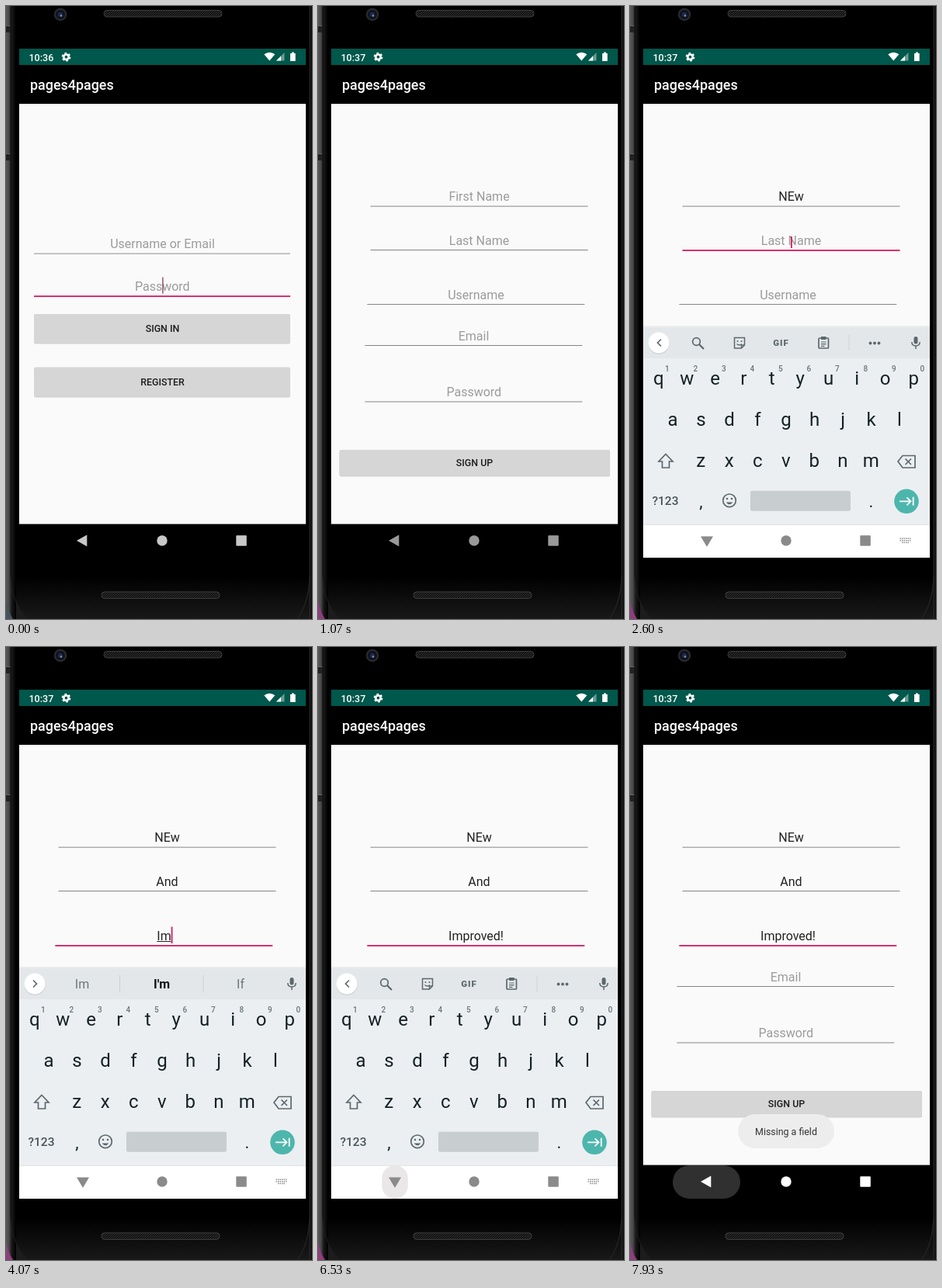
An HTML page for the animation above (8 s loop, 394 by 790 pixels).

```html
<!DOCTYPE html>
<html lang="en">
<head>
<meta charset="utf-8">
<title>Sign up</title>
<style>
  html, body { margin: 0; width: 100%; height: 100%; overflow: hidden; background: #050505; }
  svg { display: block; width: 394px; height: 790px; }
  text { font-family: Roboto, sans-serif; white-space: pre; }
  .mid { text-anchor: middle; }
  .med { font-weight: 500; }
  .ico { fill: none; stroke: #5c686d; stroke-width: 1.7; }
</style>
</head>
<body>
<script>
const LOOP = 8000, ACCENT = '#d81b60', APP = 'pages4pages';
const OPEN = 624, OPEN_MS = 425;

// ---- markup helpers ----
const rect = (x, y, w, h, fill, more = '') =>
  `<rect x="${x}" y="${y}" width="${w}" height="${h}" fill="${fill}" ${more}/>`;
const circle = (x, y, r, fill, more = '') =>
  `<circle cx="${x}" cy="${y}" r="${r}" fill="${fill}" ${more}/>`;
const path = (d, more = '') => `<path d="${d}" ${more}/>`;
const stroke = (d, color, width) => path(d, `fill="none" stroke="${color}" stroke-width="${width}"`);
const text = (x, y, size, fill, str, cls = 'mid', more = '') =>
  `<text x="${x}" y="${y}" font-size="${size}" fill="${fill}" class="${cls}" ${more}>${str}</text>`;
const group = (id, body, more = '') => `<g id="${id}" ${more}>${body}</g>`;

const appBars = () =>
  rect(17, 126, 369, 541.6, '#fafafa') + rect(17, 126, 369, 2, 'url(#barShade)') +
  rect(17, 55, 369, 21, '#00574b') + rect(17, 76, 369, 50, '#000') +
  text(31, 108, 17.9, '#fff', APP, 'med');

const button = (id, x, y, w, h, label) =>
  rect(x, y + 1.5, w, h, '#000', 'rx="2" opacity=".16"') +
  rect(x, y, w, h, '#d6d6d6', 'rx="1.5"') +
  `<clipPath id="${id}Clip">${rect(x, y, w, h, '#000', 'rx="1.5"')}</clipPath>` +
  `<g clip-path="url(#${id}Clip)">${circle(201, y + h / 2, 0, '#000', `id="${id}" opacity="0"`)}</g>` +
  text(201.5, y + h / 2 + 4.5, 12.4, '#1c1c1c', label, 'mid med');

// centre x, baseline, underline start, underline y, hint, cursor top and bottom
const fields = [
  [207.5, 251, 67.5, 257.6, 'First Name', 234, 255],
  [207.5, 308, 67.5, 314, 'Last Name', 297, 312],
  [203.5, 377.5, 63.3, 384, 'Username', 360.5, 382],
  [200.5, 430.5, 60.3, 437, 'Email'],
  [200.8, 503, 60.3, 509.5, 'Password'],
];
const fieldMarkup = ([cx, base, x, y, hint], i) =>
  text(cx, base, 16, '#9b9b9b', hint, 'mid', `id="text${i}"`) +
  rect(x, y, 280, 1, '#858585', `id="line${i}"`);

const login = appBars() +
  text(201.5, 312, 16, '#9b9b9b', 'Username or Email') + rect(36, 318.5, 330, 1.3, '#a9a9a9') +
  text(201.3, 366.5, 16, '#9b9b9b', 'Password') + rect(36, 373.2, 330, 1.8, ACCENT) +
  rect(201.3, 349.5, 1.2, 21, '#7d2a4a') +
  button('inRipple', 36, 397, 330, 37, 'SIGN IN') +
  button('regRipple', 36, 465.5, 330, 37.5, 'REGISTER');

const signup = appBars() + fields.map(fieldMarkup).join('') +
  rect(0, 0, 1.8, 0, ACCENT, 'id="cursor"') + rect(0, 379, 0, 1, '#222', 'id="compose"') +
  button('upRipple', 27.5, 572, 348.5, 33, 'SIGN UP');

const statusIcons = text(29.5, 70.5, 12.5, '#fff', '10:36', 'med', 'id="clock"') +
  circle(77.5, 65.7, 3.2, 'none', 'stroke="#fff" stroke-width="2.6"') +
  circle(77.5, 65.7, 5, 'none', 'stroke="#fff" stroke-width="1.8" stroke-dasharray="2.6 2.636"') +
  path('M332.3 62.3Q339.3 57.3 346.3 62.3L339.3 70.5Z', 'fill="#fff"') +
  path('M358.5 60V70.5H348Z', 'fill="#fff" opacity=".4"') +
  path('M354 64.5V70.5H348Z', 'fill="#fff"') +
  path('M366 61H368V59.5H370.8V61H372.7V71H366Z', 'fill="#fff"');

const homeIcons = circle(201, 689, 6.7, 'currentColor') +
  rect(296.3, 682.3, 13.5, 13.5, 'currentColor', 'rx="1"');
const navIcons = path('M91 689L104.3 681.5V696.5Z', 'fill="currentColor"') + homeIcons;

// ---- keyboard ----
const keyRow = (keys, x, y) => [...keys].map((k, i) =>
  text(x + 36.5 * i, y, 24, '#142126', k)).join('');
const digits = [...'1234567890'].map((d, i) =>
  text(47.8 + 36.5 * i, 470.5, 10, '#69767b', d, 'mid med')).join('');

const tools = path('M40 429.5L35.5 434L40 438.5', 'class="ico"') +
  circle(85.5, 432.5, 4.8, 'none', 'class="ico"') + path('M89 436L95 442', 'class="ico" style="stroke-width:2.2"') +
  path('M134.5 427.5H147.5V437L143.5 441H134.5Z M147.5 437H143.5V441', 'class="ico" style="stroke-width:1.5"') +
  circle(138.5, 432, 1, '#5c686d') + circle(143.5, 432, 1, '#5c686d') +
  path('M137.5 435.5Q141 438.5 144 435.5', 'class="ico" style="stroke-width:1.4"') +
  text(194.5, 438.3, 11.5, '#5c686d', 'GIF', 'mid', 'font-weight="900" letter-spacing=".9"') +
  rect(243, 428, 12.5, 13, 'none', 'class="ico" rx="1"') + rect(246, 426, 6.5, 4, '#5c686d') +
  path('M246 433H252.5M246 435.7H252.5M246 438.3H250.5', 'class="ico" style="stroke-width:1.2"') +
  rect(281.5, 424, 1, 20, '#cfd4d6') +
  [309.5, 315, 320.5].map(x => circle(x, 434.5, 1.9, '#5c686d')).join('');

const chips = path('M35 429.5L39.5 434L35 438.5', 'class="ico"') +
  rect(146, 423, 1, 22, '#cbd0d2') + rect(253.5, 423, 1, 22, '#cbd0d2') +
  [98, 200.5, 302].map((x, i) =>
    text(x, 440, 16, i === 1 ? '#111' : '#6b767b', '', 'mid', `id="chip${i}" font-weight="${i === 1 ? 700 : 400}"`)).join('');

const mic = rect(365.5, 426, 5, 9.5, '#5c686d', 'rx="2.5"') +
  path('M362.8 433Q363 438 368 438Q373 438 373.2 433M368 438V442', 'class="ico" style="stroke-width:1.5"');

const keys = rect(17, 414, 369, 340, '#eceff1') + rect(17, 414, 369, 40, '#e4e7e9') +
  rect(17, 412, 369, 2, '#000', 'opacity=".05"') +
  circle(37, 435, 13.8, '#000', 'opacity=".1"') + circle(37, 434, 13.5, '#fff') +
  group('tools', tools) + group('chips', chips) + mic +
  keyRow('qwertyuiop', 36.7, 488) + digits + keyRow('asdfghjkl', 55, 541) + keyRow('zxcvbnm', 91.3, 594) +
  path('M46 577.5L55 587H50.5V595H41.5V587H37Z', 'class="ico"') +
  path('M345 587L351 579.5H367V595H351Z M354.5 583.5L362 591M362 583.5L354.5 591', 'class="ico"') +
  text(45.5, 643, 15.5, '#46545a', '?123', 'mid med') + text(91.5, 646, 22, '#142126', ',') +
  circle(128, 637.3, 8.3, 'none', 'class="ico"') + circle(125, 635, 1.3, '#5c686d') + circle(131, 635, 1.3, '#5c686d') +
  path('M123.5 639.5Q128 645 132.5 639.5Z', 'fill="#5c686d"') +
  rect(155, 624.7, 129, 26, '#c8cdcf', 'rx="2"') + text(310.5, 646, 22, '#142126', '.') +
  circle(356, 638.3, 15.8, '#4db6ac') +
  stroke('M347 638.3H361M356.5 633.3L361.5 638.3L356.5 643.3M364.7 632.8V643.8', '#fff', 1.8);

const keyDots = [0, 1, 2].map(r => [0, 1, 2, 3, 4, 5].map(c =>
  r === 2 && (c === 0 || c === 5) ? '' : rect(347.5 + c * 2.5, 685.5 + r * 2.6, 1.5, 1.5, '#8a8a8a')).join('')).join('');
const whiteNav = rect(17, 668, 369, 43, '#fff') + rect(17, 668, 369, 1, '#e3e3e3') +
  rect(0, 668, 0, 43, '#e9e7e7', 'id="downRipple" rx="16"') +
  path('M91 683.5H107L99 697Z', 'fill="#8a8a8a"') +
  `<g color="#8a8a8a">${homeIcons}</g>` + keyDots;

// ---- phone body ----
const speaker = (x, y) => rect(x, y, 152, 8.5, 'url(#mesh)', 'rx="4" stroke="#3d3d3d"');
const shell = rect(0, 0, 394, 790, '#000') +
  rect(0, 735, 394, 55, 'url(#foot)') +
  path('M0 0H6V735Q8 772 29 790H0Z', 'fill="url(#side)"') +
  rect(7, 0, 6, 790, 'url(#rim)') +
  rect(390.5, 0, 1.2, 790, '#2b2b2b') + rect(392, 0, 2, 790, '#111') +
  [25, 190].map(y => rect(0, y, 6, 9, '#222') + rect(0, y, 6, 1, '#666')).join('') +
  path('M0 766Q3 781 9 790H0Z', 'fill="#46525c" id="desk"') +
  stroke('M6 0V735Q8 772 30 792', '#1c1c1c', 1.2) +
  stroke('M391 735Q390 770 374 792', '#222', 1.5) +
  speaker(126, 5.5) + speaker(123, 755) +
  circle(70, 11, 8.3, '#292a2e') + circle(70, 11, 6, '#10131c') + circle(70, 11, 3, '#1f2c50') + circle(71, 12.5, 1.2, '#8497c4');

const grad = (id, dir, ...stops) => `<linearGradient id="${id}" ${dir}>` + stops.map(([o, c, a = 1]) =>
  `<stop offset="${o}" stop-color="${c}" stop-opacity="${a}"/>`).join('') + '</linearGradient>';

document.body.innerHTML = `<svg viewBox="0 0 394 790"><defs>
  ${grad('side', 'gradientUnits="userSpaceOnUse" x1="0" x2="7"', [0, '#5a5a5a'], [.55, '#484848'], [1, '#1c1c1c'])}
  ${grad('rim', 'x2="1"', [0, '#1b1b1b'], [1, '#000'])}
  ${grad('foot', 'x2="0" y2="1"', [0, '#000'], [1, '#191919'])}
  ${grad('barShade', 'x2="0" y2="1"', [0, '#000', .12], [1, '#000', 0])}
  <pattern id="mesh" width="3" height="3" patternUnits="userSpaceOnUse">${rect(0, 0, 3, 3, '#111') + path('M0 3L3 0', 'stroke="#333"')}</pattern>
  <clipPath id="screen">${rect(17, 55, 369, 656, '#000')}</clipPath>
  <clipPath id="reveal">${rect(17, 55, 369, 656, '#000', 'id="revealBox"')}</clipPath></defs>
  ${shell}
  <g clip-path="url(#screen)">
    ${rect(17, 55, 369, 656, '#000')}
    ${group('login', login)}
    ${group('signup', signup, 'clip-path="url(#reveal)"')}
    ${statusIcons}
    ${rect(0, 668, 0, 43, '#303030', 'id="backRipple" rx="21"')}
    ${group('nav', navIcons)}
    ${group('toast', rect(139, 602, 124, 44, '#ededed', 'rx="22"') + text(201, 629, 12.4, '#333', 'Missing a field'))}
    ${group('board', group('keys', keys) + whiteNav)}
  </g></svg>`;

const $ = {};
document.querySelectorAll('[id]').forEach(el => $[el.id] = el);
const set = (el, attrs) => { for (const k in attrs) el.setAttribute(k, attrs[k]); };
const show = (el, on) => { el.style.display = on ? '' : 'none'; };

// ---- timing ----
const clamp = x => Math.min(1, Math.max(0, x));
const span = (t, from, to) => clamp((t - from) / (to - from));
const bez = (p, u) => { const v = 1 - u; return p[0]*v*v*v + 3*p[1]*u*v*v + 3*p[2]*u*u*v + p[3]*u*u*u; };
function curve(x, xs, ys) {
  let lo = 0, hi = 1;
  for (let i = 0; i < 24; i++) {
    const m = (lo + hi) / 2;
    if (bez(xs, m) < x) lo = m; else hi = m;
  }
  return bez(ys, lo);
}
const easeStd = x => curve(x, [0, .4, .2, 1], [0, 0, 1, 1]);
const easeReveal = x => x < 1 / 6
  ? curve(x, [0, .05, .1333, .1667], [0, 0, .06, .4])
  : curve(x, [.1667, .2083, .25, 1], [.4, .82, 1, 1]);

// time, focused field, its text, suggestions (none: tool strip)
const steps = [
  [1730, 0, ''],
  [2130, 0, 'N', 'N|No|Not'], [2270, 0, 'NE', 'NE|New|Need'], [2470, 0, 'NEw', 'NEw|New|News'],
  [2600, 1, ''],
  [2930, 1, 'A', 'A|And|As'], [3270, 1, 'An', 'An|And|Any'], [3400, 1, 'And', 'And|Andy|Ands'],
  [3600, 2, ''],
  [3930, 2, 'I', "I|I'm|If"], [4070, 2, 'Im', "Im|I'm|If"],
  [4330, 2, 'Imp', 'Imp|Important|Impact'], [4400, 2, 'Impr', 'Impr|Improve|Impress'],
  [4530, 2, 'Impro', 'Impro|Improve|Improved'], [4600, 2, 'Improv', 'Improv|Improve|Improved'],
  [4730, 2, 'Improve', 'Improves|Improve|Improved'], [4800, 2, 'Improved', 'Improve|Improved|Improves'],
  [5010, 2, 'Improved!'],
];

let shown = -2;
function applyStep(n) {
  if (n === shown) return;
  shown = n;
  const values = ['', '', '', '', ''];
  for (let i = 0; i <= n; i++) values[steps[i][1]] = steps[i][2];
  const [, focus = -1, typed, hints] = steps[n] || [];
  fields.forEach(([, , , y, hint], i) => {
    $['text' + i].textContent = values[i] || hint;
    set($['text' + i], { fill: values[i] ? '#222' : '#9b9b9b' });
    set($['line' + i], { y, height: i === focus ? 1.8 : 1, fill: i === focus ? ACCENT : '#858585' });
  });
  show($.tools, !hints);
  show($.chips, hints);
  (hints || '||').split('|').forEach((s, i) => $['chip' + i].textContent = s);
  if (focus < 0) return;
  const [cx, base, , , , top, bottom] = fields[focus];
  const w = typed ? $['text' + focus].getComputedTextLength() : 0;
  set($.cursor, { x: cx + w / 2 - (w ? 0 : .5), y: top, height: bottom - top });
  set($.compose, { x: cx - w / 2, y: base + 1.5, width: hints ? w : 0 });
}

function press(el, t, start, end) {
  const grow = 1 - (1 - span(t, start, start + 350)) ** 2;
  const on = t >= start && t < end;
  set(el, { r: on ? 185 * grow : 0, opacity: .16 * (1 - span(t, end - 200, end)) });
}

function navPress(el, cx, t, start) {
  const k = clamp(1.35 * (1 - 400 ** (-1.4 * span(t, start, start + 350))));
  const w = t >= start ? 87 * k : 0;
  set(el, { x: cx - w / 2, width: w, rx: Math.min(21.5, w / 2) });
}

function draw(t) {
  const late = t >= 70;
  $.clock.textContent = late ? '10:37' : '10:36';
  set($.desk, { fill: late ? '#8c3f7c' : '#46525c' });
  set($.nav, { color: !late ? '#c8c8c8' : t < 1800 ? '#999' : '#fff' });

  // window change, on whole pixels
  const x = span(t, OPEN, OPEN + OPEN_MS), p = easeStd(x);
  show($.login, x < 1);
  set($.login, { transform: `translate(0 ${Math.round(-13 * p)})`, opacity: 1 - .1 * span(t, OPEN, OPEN + 117) });
  show($.signup, t >= OPEN);
  set($.signup, { transform: `translate(0 ${Math.round(27 * (1 - p))})` });
  const cut = x < 1 ? Math.round(629 * (1 - easeReveal(x))) : 0;
  set($.revealBox, { y: 55 + cut, height: 656 - cut });
  press($.regRipple, t, 70, 720);
  press($.upRipple, t, 7070, 7600);

  // typing
  let n = -1;
  while (n + 1 < steps.length && t >= steps[n + 1][0]) n++;
  applyStep(n);
  show($.cursor, n >= 0 && Math.floor((t - steps[n][0]) / 505) % 2 === 0);

  // keyboard in and out
  const inn = 1 - (1 - span(t, 1760, 2010)) ** 3, out = span(t, 6620, 6920) ** 2;
  const vis = inn * (1 - out);
  show($.board, vis > 0);
  set($.board, { opacity: vis });
  set($.keys, { transform: `translate(0 ${30 * (1 - inn + out)})` });
  navPress($.downRipple, 99, t, 6517);
  navPress($.backRipple, 98.5, t, 7864);

  const toast = span(t, 7250, 7500);
  show($.toast, toast > 0);
  set($.toast, { opacity: toast });
}

const begin = performance.now();
(function tick() {
  draw((performance.now() - begin) % LOOP);
  requestAnimationFrame(tick);
})();
</script>
</body>
</html>
```
